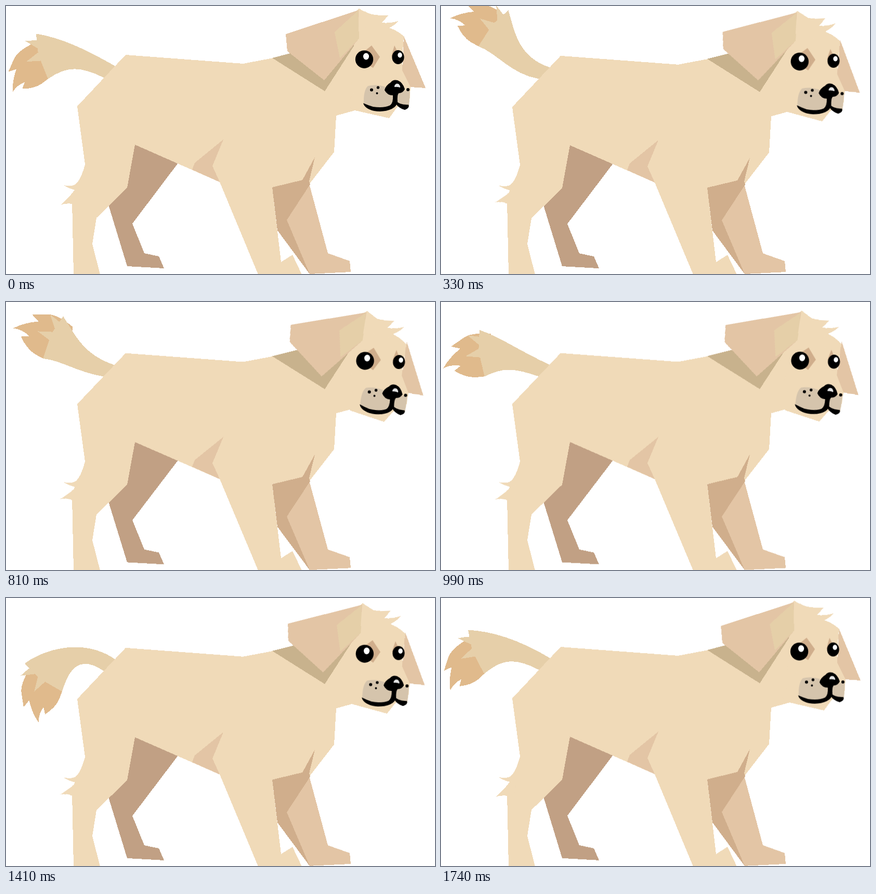
Animation of 825 by 516 pixels, one loop 1.77 s. Source, as an HTML page:

```html
<!DOCTYPE html>
<html lang="en">
<head>
<meta charset="utf-8">
<title>Dog wagging its tail</title>
<style>
  html, body { margin: 0; width: 100%; height: 100%; overflow: hidden; background: #fff; }
  svg { display: block; width: 825px; height: 516px; }
  .skin { fill: #f0dab8; }
  .fur { fill: #e6cfa9; }
  .tan { fill: #e3c5a5; }
  .brown { fill: #d0ae8c; }
  .crisp { shape-rendering: crispEdges; }

  /* the body sinks towards the feet while the head nods */
  #body { transform-origin: 0 516px; animation: sink 885ms linear infinite alternate; }
  .nod { animation: turn 885ms linear infinite alternate; }
  #skull { transform-origin: 608px 111px; --turn: 9.8deg; }
  #face { transform-origin: 583px 124px; --turn: 6.2deg; }
  .flutter { animation: turn 295ms ease-in-out infinite alternate; }
  #fringe { transform-origin: 712px 35px; --turn: -7deg; }
  #hock { transform-origin: 135px 375px; --turn: 11deg; }
  @keyframes sink { to { transform: scaleY(.9884); } }
  @keyframes turn { to { transform: rotate(var(--turn)); } }
</style>
</head>
<body>
<svg viewBox="0 0 825 516">
  <g class="crisp">
    <path id="tips" fill="#e0ba8c" d="M2 -36 L-14 -58 L-32 -66 Q-60 -50 -66 -36 L-76 -10 L-61 -16
      Q-68 8 -66 28 Q-58 14 -44 8 L-48 21 Q-26 20 -12 10 L0 0Z"/>
    <path id="tuft" class="fur" d="M0 0 L2 -36 L-42 -33 L-14 -55 L-44 -73 Q-24 -75 -5 -73 L-23 -87Z"/>
    <path id="stalk" class="fur"/>
  </g>

  <g id="body" class="crisp">
    <path fill="#c1a084" d="M242 255 L338 293 L243 419 L266 476 L294 482 L304 505 L233 501 L194 373 L225 345Z"/>
    <path class="skin" d="M230 94 L456 111 L514 100 L590 80 L676 66 L700 150 L671 201 L635 211 L631 281
      L584 342 L512 349 L529 493 L551 479 L569 517 L485 517 L411 339 L248 267 L233 350 L174 408 L166 458
      L181 517 L130 517 L127 375 L132 354 Q120 351 111 345 Q127 348 134 343 Q144 335 152 305 L137 193Z"/>
    <path id="hock" class="skin flutter" d="M140 382 L127 381 Q116 379 105 383 Q119 372 132 354 L145 350Z"/>
    <path fill="#c8b28d" d="M512 100 L590 80 L676 66 L613 164Z"/>
    <path class="tan" d="M418 257 L397 308 L411 339 L358 315 L363 302Z
      M583 342 L619 476 L661 491 L663 512 L584 516 L540 412Z"/>
    <path class="brown" d="M512 349 L570 335 L594 291 L583 337 L585 343 L540 412 L584 516 L522 432Z"/>
  </g>

  <g id="skull" class="nod crisp">
    <path class="skin" d="M660 20 L679 5 L697 15 L722 32 L737 42 Q752 47 765 58 L762 100 L690 150 L665 150 L672 95Z"/>
    <path id="fringe" class="skin flutter" d="M690 10 Q701 19 735 18 Q729 26 722 32 Q738 34 754 29
      Q748 37 737 42 L715 60 L690 40Z"/>
    <path class="tan" d="M538 54 L678 8 L676 66 L612 143 L541 87Z"/>
    <path fill="#e5cfa8" d="M677 9 L679 62 L642 101 L632 50Z"/>
  </g>

  <g id="face" class="nod">
    <g class="crisp">
      <path class="skin" d="M700 85 L764 62 L762 124 L778 156 L776 185 L752 195 L737 216 L671 201 L655 190 L695 125Z"/>
      <path class="tan" d="M765 58 L807 158 L778 156 L762 124Z"/>
    </g>
    <path class="brown" d="M688 88 L703 76 L719 98 L706 119 L694 112Z M747 76 L755 92 L741 97Z"/>
    <path fill="#d5c4ac" d="M688 190 Q687 162 696 154 Q712 150 728 155 L748 170 L749 191 Q735 199 715 200Z
      M750 170 L777 159 L775 193 L766 197 L750 187Z"/>
    <circle cx="689" cy="102.7" r="17.2"/>
    <ellipse cx="754" cy="98.5" rx="11.6" ry="13.6"/>
    <g fill="#fff">
      <ellipse cx="692.5" cy="97" rx="5.6" ry="6.4"/>
      <ellipse cx="757.5" cy="94.5" rx="4.2" ry="5"/>
    </g>
    <path d="M728 162 Q730 153 740 147 Q744 141 753 143 Q763 147 767 160 Q764 167 755 168 Q752 172 753 184
      Q752 193 742 198 Q727 205 708 202 Q690 198 687 187 Q696 191 706 194 Q727 197 739 191 Q745 186 744 172
      Q733 172 728 162Z"/>
    <path d="M750 182 Q757 191 774 190 Q777 196 767 200 Q755 197 749 187Z"/>
    <path fill="#e4e4e4" d="M747 154 Q749 148 755 150 Q759 154 758 157 Q752 155 747 156Z"/>
    <circle cx="703" cy="161.5" r="3"/>
    <circle cx="715.5" cy="157" r="2.7"/>
    <circle cx="713.5" cy="168" r="2"/>
    <circle cx="773" cy="161" r="3"/>
  </g>
</svg>
<script>
const LOOP = 1770, STEP = 30;
const [tips, tuft, stalk] = ['tips', 'tuft', 'stalk'].map(id => document.getElementById(id));

// Point at a distance and direction (degrees) from another point.
const reach = ([x, y], length, deg) => {
  const a = deg * Math.PI / 180;
  return [x + length * Math.cos(a), y + length * Math.sin(a)];
};

// Every part of the tail swings on one sine; the tips lag most.
function drawTail(t) {
  const phase = 2 * Math.PI * t / LOOP;
  const wave = lag => Math.sin(phase - lag);
  const sink = Math.min(t, LOOP - t) / LOOP * 12;

  const turn = 14 + 52 * wave(.27);
  const bend = 15 + 13 * wave(1.32);
  const swing = wave(.15), arc = Math.cos(2 * phase);
  const root = [84 - 19 * swing - 6 * arc, 128 - 56 * swing + 4 * arc];
  const spike = reach(root, 90, turn - 105);
  const inner = reach(root, 50, turn - 112);

  const lift = wave(.45);
  const top = [212, 117 + sink], low = [188, 138 + sink];
  const upper = [reach(spike, 46, 1.18 * turn + 9), [top[0] - 63, top[1] - 30 + 15 * lift], top];
  const lower = [[low[0] - 52, low[1] - 19 + 16 * lift], reach(root, 38, turn - 34), root];

  stalk.setAttribute('d', `M${root}L${inner}L${spike}C${upper.join(' ')}l14 8L${low}C${lower.join(' ')}Z`);
  tuft.setAttribute('transform', `translate(${root}) rotate(${turn})`);
  tips.setAttribute('transform', `translate(${root}) rotate(${turn + bend}) scale(${1 + .005 * bend})`);
}

function tick() {
  drawTail(Math.floor(performance.now() % LOOP / STEP) * STEP);
  requestAnimationFrame(tick);
}
tick();
</script>
</body>
</html>
```
